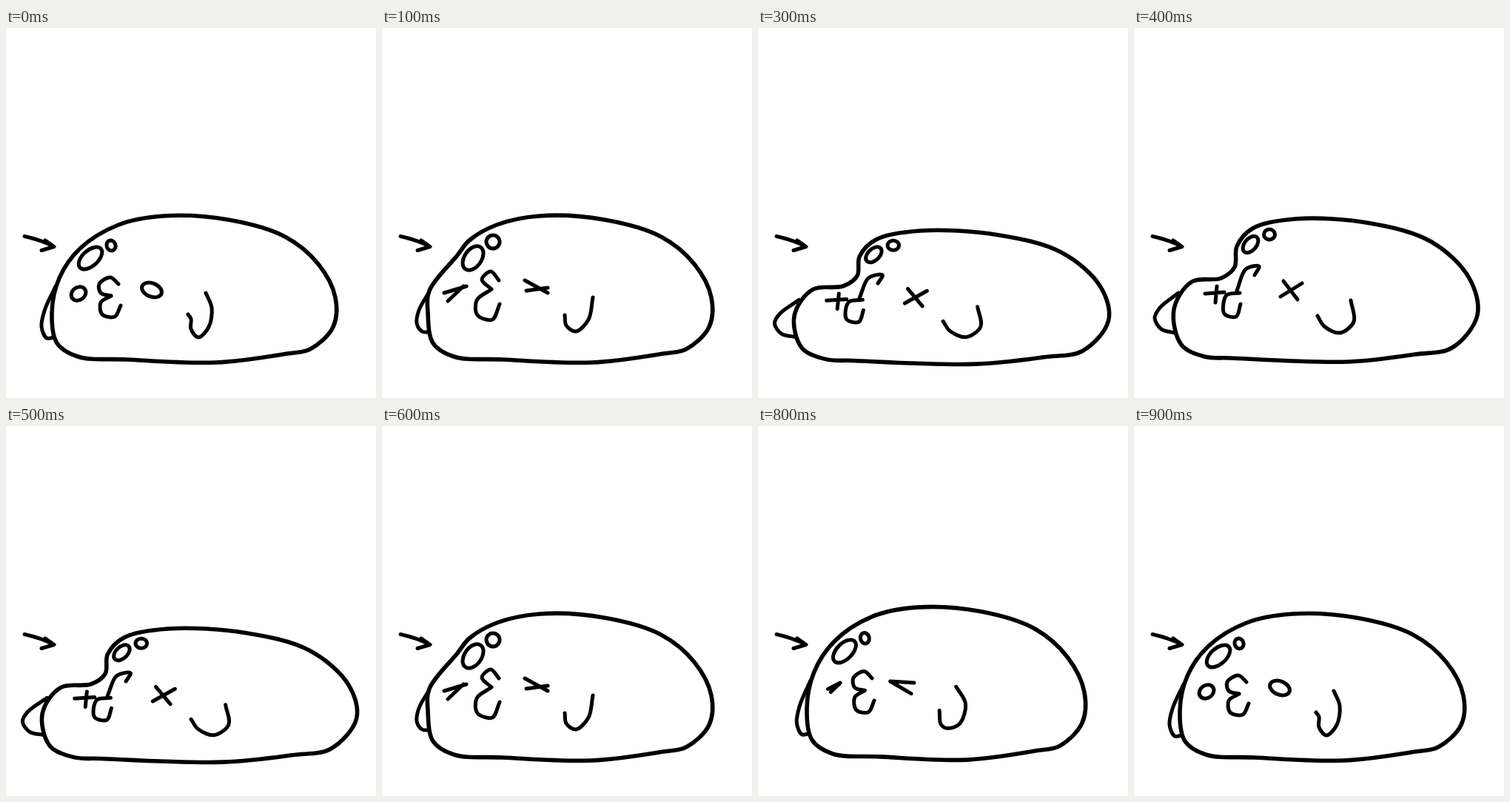
These frames come from a looping animation (500 px wide and 500 px high, 1 s). An HTML page:

```html
<!DOCTYPE html>
<html lang="en">
<head>
<meta charset="utf-8">
<title>Squishy blob</title>
<style>
html, body { margin: 0; width: 100%; height: 100%; overflow: hidden; background: #fff; }
svg { display: block; width: 100vw; height: 100vh; }
path, ellipse {
  fill: none; stroke: #000; stroke-width: 5; stroke-linecap: round; stroke-linejoin: round;
  vector-effect: non-scaling-stroke;
}
.body { stroke-width: 5.6; }
</style>
</head>
<body>
<svg id="stage" viewBox="0 0 500 500">
  <path d="M25 281.5Q46 286 64 295M53 287L65 295.5L48 300.5"/>
</svg>
<script>
const pts = s => s.split(' ').map(p => p.split(',').map(Number));
const gap = (a, b) => Math.sqrt(Math.hypot(b[0] - a[0], b[1] - a[1]));

// Centripetal Catmull-Rom spline through a few key points
function curve(p, closed) {
  const n = p.length;
  const beyond = (a, b) => [2 * a[0] - b[0], 2 * a[1] - b[1]];
  const at = i => closed ? p[(i + n) % n]
    : i < 0 ? beyond(p[0], p[1])
    : i >= n ? beyond(p[n - 1], p[n - 2]) : p[i];
  const slope = i => {
    const [a, b, c] = [at(i - 1), at(i), at(i + 1)];
    const [s, t] = [gap(a, b), gap(b, c)];
    return [0, 1].map(k => (b[k] - a[k]) / s - (c[k] - a[k]) / (s + t) + (c[k] - b[k]) / t);
  };
  let d = 'M' + p[0];
  for (let i = 0; i < (closed ? n : n - 1); i++) {
    const [b, c, u, v] = [at(i), at(i + 1), slope(i), slope(i + 1)];
    const t = gap(b, c) / 3;
    d += `C${[0, 1].map(k => b[k] + u[k] * t)} ${[0, 1].map(k => c[k] - v[k] * t)} ${c}`;
  }
  return d + (closed ? 'Z' : '');
}

// Scale a whole pose about a pivot
const stretch = (sx, sy, x, y) =>
  `translate(${x} ${y}) scale(${sx} ${sy}) translate(${-x} ${-y})`;

// ovals: [cx, cy, rx, ry, tilt]; lines: curves for foot, mouth and arm
const back = '213,254 300,259 377,282 422,319 445,364 442,404 411,434 380,440 283,452 163,448 97,444 69,426 62,385 ';
const rest = {
  body: back + '72,338 100,298 152,266',
  lines: ['67,349 52,382 48,404 55,419 65,418',
          '152,346 141,337 126,346 128,358 142,362',
          '142,362 128,371 130,387 147,390 155,375'],
  arm: '270,358 278,378 274,404 260,418 250,407 250,393 246,387',
  ovals: [[114, 311, 19, 10.5, -42], [142, 294, 6, 7, -20]],
  eyeballs: [[98, 359, 10.5, 8.5, -35], [197, 354, 14, 9, 22]],
  squint: ''
};
const dent = {
  body: back + '64,355 102,307 118,287 155,266',
  lines: ['63,358 50,381 47,399 54,410 62,411',
          '158,341 147,329 135,340 148,353',
          '148,353 128,368 129,388 149,394 159,373'],
  arm: '285,364 279,394 262,410 249,402 247,388',
  ovals: [[123, 311, 18, 11.5, -55], [150, 289, 9, 9, 0]],
  squint: 'M84 358L114 349M89 369L110 349M193 341L224 358M195 355L224 351'
};
const press = {
  body: '218,258 320,264 402,289 453,338 464,388 430,432 380,441 290,451 130,446 95,444 64,428 54,380 78,343 118,338 136,323 139,295 160,271',
  lines: ['60,358 35,378 28,392 37,407 56,412',
          '163,334 169,322 151,326 139,355',
          '143,358 125,361 122,386 138,390 144,373'],
  arm: '293,368 297,397 278,412 257,403 248,389',
  ovals: [[157.5, 292.5, 13, 8, -50], [183, 279, 7.5, 7, 0]],
  squint: 'M96 359L122 357M112 349L110 371M202 342L221 367M227 345L198 363'
};
const deep = { ...press, form: stretch(1.035, 0.933, 189, 498) };
const tall = {
  ...rest,
  arm: '268,357 281,379 273,405 256,411 247,406 245,388',
  eyeballs: [],
  squint: 'M91 360L108 352M95 364L107 353M210 352L177 350L206 366',
  form: stretch(0.958, 1.081, 254, 475)
};
const settle = { ...tall, form: stretch(0.979, 1.04, 254, 475) };

const stage = document.getElementById('stage');
function add(parent, tag, attrs) {
  const el = document.createElementNS('http://www.w3.org/2000/svg', tag);
  for (const k in attrs) el.setAttribute(k, attrs[k]);
  return parent.appendChild(el);
}
function build({ body, lines, arm, ovals, eyeballs = [], squint, form = '' }) {
  const g = add(stage, 'g', { display: 'none', transform: form });
  add(g, 'path', { class: 'body', d: curve(pts(body), true) });
  add(g, 'path', { d: [...lines, arm].map(s => curve(pts(s))).join('') + squint });
  for (const [cx, cy, rx, ry, tilt] of [...ovals, ...eyeballs])
    add(g, 'ellipse', { cx, cy, rx, ry, transform: `rotate(${tilt} ${cx} ${cy})` });
  return g;
}

const order = [rest, dent, press, deep, press, deep, dent, tall, settle, rest];
const groups = new Map([...new Set(order)].map(p => [p, build(p)]));
const STEP = 100;
let shown = null;

function draw() {
  const g = groups.get(order[Math.floor(performance.now() / STEP) % order.length]);
  if (g !== shown) {
    if (shown) shown.setAttribute('display', 'none');
    g.removeAttribute('display');
    shown = g;
  }
  requestAnimationFrame(draw);
}
draw();
</script>
</body>
</html>
```
